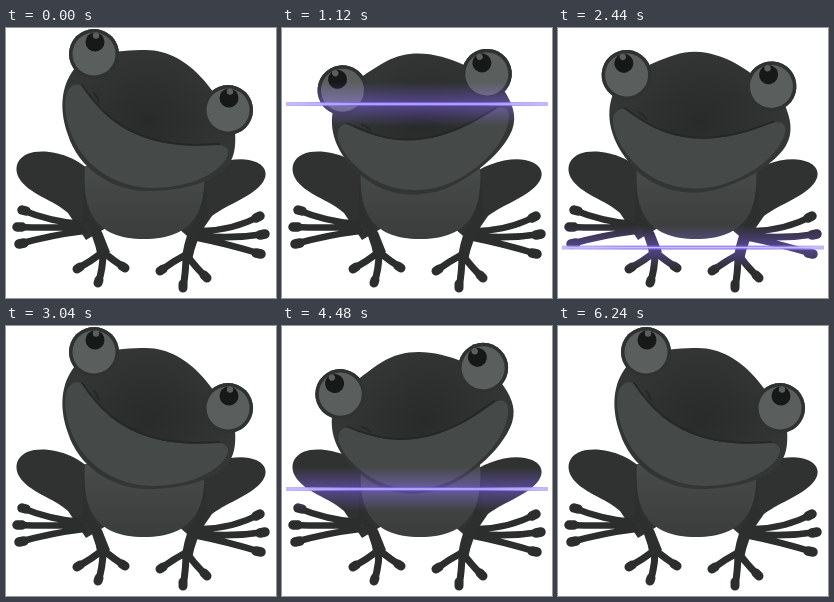
An HTML page for the animation above (6.44 s loop, 270 by 270 pixels).

```html
<!DOCTYPE html>
<html lang="en">
<head>
<meta charset="utf-8">
<title>Frog scan</title>
<style>
  html, body { margin: 0; width: 100%; height: 100%; overflow: hidden; background: #fff; }
  svg { display: block; width: 100vw; height: 100vh; isolation: isolate; }
  #glow { mix-blend-mode: screen; }
  .toes { fill: none; stroke: #2c2e2d; stroke-linecap: round; stroke-linejoin: round; }
</style>
</head>
<body>
<svg viewBox="0 0 270 270">
  <defs>
    <radialGradient id="skin">
      <stop offset="0" stop-color="#292a2a"/>
      <stop offset="1" stop-color="#333635"/>
    </radialGradient>
    <linearGradient id="belly" x2="0" y2="1">
      <stop offset="0" stop-color="#474b49"/>
      <stop offset="1" stop-color="#3a3d3c"/>
    </linearGradient>
    <linearGradient id="halo" x2="0" y2="1">
      <stop offset="0" stop-color="#5a35d8" stop-opacity="0"/>
      <stop offset=".5" stop-color="#5a35d8" stop-opacity=".55"/>
      <stop offset="1" stop-color="#5a35d8" stop-opacity="0"/>
    </linearGradient>
    <linearGradient id="beam">
      <stop offset="0" stop-color="#b3a9f6"/>
      <stop offset=".25" stop-color="#8066f2"/>
      <stop offset=".75" stop-color="#8066f2"/>
      <stop offset="1" stop-color="#b3a9f6"/>
    </linearGradient>
    <g id="eye">
      <circle r="25" fill="#303231"/>
      <circle r="21.5" fill="#5a5f5d"/>
      <circle cx="1" cy="-12" r="9.5" fill="#171818"/>
      <circle cx="2" cy="-18.5" r="3.2" fill="#5a5f5d"/>
    </g>
  </defs>
  <rect width="270" height="270" fill="#fff"/>

  <!-- hind legs -->
  <path fill="#303231" d="M90 150C76 130 48 121 28 124C12 127 7 139 13 150C22 166 48 172 62 185L80 212L100 200Z"/>
  <path fill="#303231" d="M186 150C200 137 225 129 243 132C259 135 263 145 257 154C248 168 222 176 206 188L188 214L172 200Z"/>
  <g class="toes" stroke-width="6.5">
    <path d="M76 196Q45 194 16 182M74 199Q42 200 11 199M78 203Q45 207 13 216"/>
    <path d="M196 203Q228 202 254 188M194 208Q228 211 259 206M192 210Q222 216 255 226"/>
  </g>
  <g class="toes" stroke-width="9.5">
    <path d="M16 182l4 1M11 199h5M13 216l5-1M254 188l-4 2M259 206l-5 1M255 226l-5-1"/>
  </g>

  <!-- torso and front legs -->
  <path fill="url(#belly)" d="M79 138C76 182 88 211 138 211C188 211 201 182 198 138Z"/>
  <path fill="#2d2f2e" d="M78 150C78 180 86 194 96 204Q100 214 104 224L92 230Q88 206 76 190Z"/>
  <path fill="#2d2f2e" d="M199 150C198 180 190 194 182 204Q178 216 176 228L186 232Q190 212 202 190Z"/>
  <g class="toes" stroke-width="7">
    <path d="M97 224Q84 234 71 241M97 224Q97 242 92 255M97 224Q108 233 119 240"/>
    <path d="M181 226Q166 234 154 243M180 226Q180 244 177 260M180 226Q190 240 201 250"/>
  </g>
  <g class="toes" stroke-width="9">
    <path d="M71 241l3-2M92 255l1-3M119 240l-3-2M154 243l3-2M177 260v-4M201 250l-3-3"/>
  </g>

  <g id="head">
    <use href="#eye" x="88" y="26"/>
    <use href="#eye" x="222" y="82"/>
    <path fill="url(#skin)" d="M66 44C54 62 54 85 62 107C72 139 104 163 142 163C180 163 205 153 217 143C229 133 230 118 229 104C215 70 185 22 140 22C110 22 78 26 66 44Z"/>
    <path fill="#454947" d="M60 68C62 57 72 53 78 60C93 83 112 102 146 112C172 119 192 118 211 117C221 117 225 123 220 131C209 148 180 160 146 160C107 159 78 137 66 108C60 93 58 79 60 68Z"/>
    <path fill="none" stroke="#262827" stroke-width="2" stroke-linecap="round" d="M76 57C93 82 112 101 146 111C172 118 192 117 213 116M88 65Q92 69 93 74"/>
    <use href="#eye" x="88" y="26"/>
    <use href="#eye" x="222" y="82"/>
  </g>

  <rect id="glow" x="4" y="-22" width="262" height="44" fill="url(#halo)"/>
  <g id="line">
    <rect x="4" y="-2" width="262" height="4" fill="url(#beam)" opacity=".8"/>
    <rect x="8" y="-.7" width="254" height="1.4" fill="#c9bcff"/>
  </g>
</svg>
<script>
  const LOOP = 6440, STEP = 40, START = 200, END = 3040, MID = (START + END) / 2;
  const [head, glow, line] = ['head', 'glow', 'line'].map(id => document.getElementById(id));

  // Scan down, hold, then play the same poses backwards.
  function scanTime(ms) {
    const t = Math.floor(ms % LOOP / STEP) * STEP;
    const s = t < END ? t : t < 3400 ? END : 6400 - t;
    return Math.min(END, Math.max(START, s));
  }

  function draw(ms) {
    const t = scanTime(ms);
    const u = Math.abs(t - MID) / (MID - START);
    const upright = u * u * (.7 + 2.6 * u - 2.3 * u * u);
    const y = 130.4 + .10875 * (t - MID);
    head.setAttribute('transform', `rotate(${-34.9 * (1 - upright)} 144 97)`);
    for (const part of [glow, line]) {
      part.setAttribute('transform', `translate(0 ${y})`);
      part.style.visibility = t > 340 && t < END ? 'visible' : 'hidden';
    }
  }

  const begin = performance.now();
  function tick() {
    draw(performance.now() - begin);
    requestAnimationFrame(tick);
  }
  tick();
</script>
</body>
</html>
```
